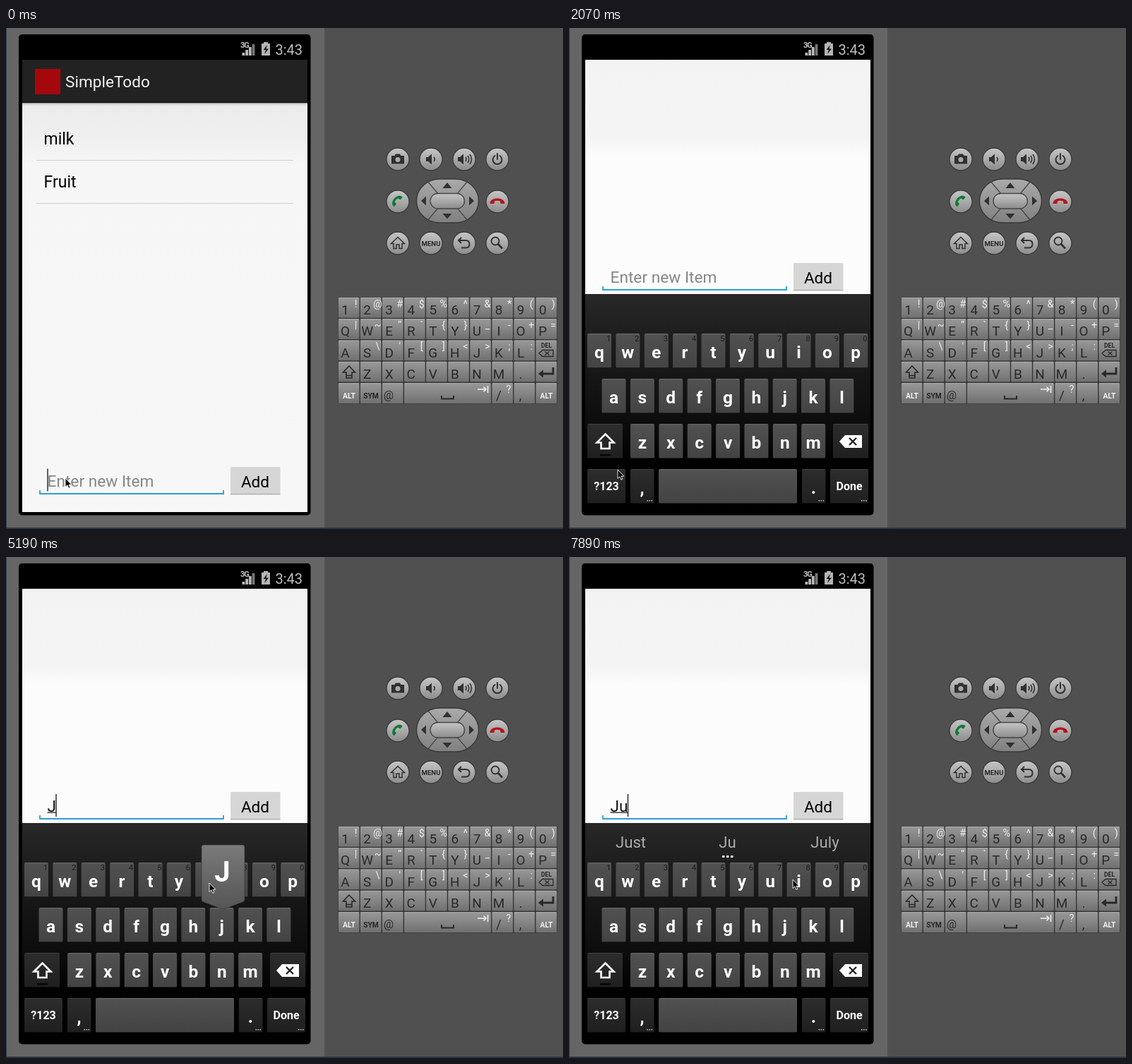
An HTML page that plays this animation: 789x710 px, repeating every 8000 ms.

```html
<!DOCTYPE html>
<html lang="en">
<head>
<meta charset="utf-8">
<title>To-do list in an emulator</title>
<style>
  html, body { margin: 0; width: 100%; height: 100%; overflow: hidden; background: #505050; }
  svg { display: block; width: 789px; height: 710px; }
  text { font-family: Roboto, "Noto Sans", sans-serif; white-space: pre; }
</style>
</head>
<body>
<svg id="stage" viewBox="0 0 789 710" xmlns="http://www.w3.org/2000/svg"></svg>
<script>
const LOOP = 8000;
const stage = document.getElementById('stage');

// Markup helpers
const rect = (x, y, w, h, fill, more = '') =>
  `<rect x="${x}" y="${y}" width="${w}" height="${h}" fill="${fill}" ${more}/>`;
const path = (d, fill, more = '') => `<path d="${d}" fill="${fill}" ${more}/>`;
const line = (d, color, width = 2, more = '') =>
  path(d, 'none', `stroke="${color}" stroke-width="${width}" ${more}`);
const text = (x, y, s, size, fill, more = '') => {
  const safe = s.replace(/&/g, '&amp;').replace(/</g, '&lt;');
  return `<text x="${x}" y="${y}" font-size="${size}" fill="${fill}" ${more}>${safe}</text>`;
};
const group = (id, body, more = '') => `<g id="${id}" ${more}>${body}</g>`;
const shade = (id, ...stops) =>
  `<linearGradient id="${id}" x2="0" y2="1">` + stops.map(([at, color]) =>
    `<stop offset="${at}" stop-color="${color}"/>`).join('') + '</linearGradient>';
const MID = 'text-anchor="middle"';
const BOLD = 'font-weight="700"';
const INK = '#303030';

const defs = '<defs>' +
  shade('listBg', [0, '#e9e9e9'], [.17, '#efefef'], [.23, '#f6f6f6'], [1, '#f7f7f7']) +
  shade('plainBg', [0, '#f3f3f3'], [.17, '#f4f4f4'], [.215, '#fcfcfc'], [1, '#fcfcfc']) +
  shade('boardBg', [0, '#282828'], [.18, '#1e1e1e'], [.6, '#0c0c0c'], [.75, '#020202'], [1, '#000']) +
  shade('key', [0, '#575757'], [.08, '#505050'], [1, '#434343']) +
  shade('darkKey', [0, '#2d2d2d'], [1, '#1f1f1f']) +
  shade('popBg', [0, '#7a7a7a'], [1, '#555']) +
  shade('knob', [0, '#c6c6c6'], [.5, '#aaa'], [1, '#8c8c8c']) +
  shade('pad', [0, '#aaa'], [1, '#808080']) +
  shade('hard', [0, '#989898'], [.5, '#858585'], [1, '#707070']) +
  '<clipPath id="screen"><rect x="23" y="45" width="404" height="641"/></clipPath></defs>';

function shell() {
  return rect(0, 0, 789, 710, '#505050') +
    rect(0, 0, 450, 710, '#656565') +
    rect(449, 0, 1.5, 708, '#6c6c6c') + rect(450.5, 0, 1.5, 708, '#585858') +
    rect(0, 0, 1, 710, '#21434b') + rect(0, 708, 789, 2, '#2a3644') +
    rect(18, 9, 413.5, 681.5, '#000', 'rx="5"') +
    text(332, 28, '3G', 11, '#c4c4c4', BOLD + ' letter-spacing="-1"') +
    [0, 1, 2, 3].map(i => rect(334.5 + i * 4.7, 35 - i * 4, 3.8, 4 + i * 4, i < 3 ? '#b9b9b9' : '#777')).join('') +
    path('M362 22H365V20H371V22H374V39H362Z', '#b5b5b5') +
    path('M370 24L364.5 31H368L366 37L372 29.500H368.500Z', '#111') +
    text(381.500, 37.500, '3:43', 20, '#bebebe');
}

function listView() {
  return rect(23, 45, 404, 641, 'url(#listBg)') +
    rect(23, 45, 404, 61, '#222') + rect(23, 105, 404, 1.5, '#111') +
    rect(23, 106.5, 404, 3, '#c8c8c8', 'opacity=".6"') +
    rect(41, 58, 36, 36, '#a5080c') +
    text(84, 84, 'SimpleTodo', 22.6, '#f3f3f3') +
    ['milk', 'Fruit'].map((s, i) =>
      text(53.5, 165 + i * 61, s, 23, '#000') + rect(43, 187 + i * 61, 364, 1, '#cfcfcf')).join('');
}

// Input row: hint, underline and button
const inputRow = id => group(id,
  text(58.5, 649.500, 'Enter new Item', 22.7, '#868686', 'class="hint"') +
  line('M48 655V660H308V655', '#2b9fd3', 1.8) +
  rect(318, 622, 70.5, 39, '#d6d6d6', 'rx="1.500"') + rect(318, 660, 70.5, 1.3, '#a9a9a9') +
  text(353, 651, 'Add', 22.6, '#000', MID));

function softBoard() {
  const key = (x, y, w, fill = 'key') =>
    rect(x, y, w, 49, `url(#${fill})`, 'rx="2"') +
    rect(x + 1, y, w - 2, 1, '#fff', 'opacity=".1"') + rect(x + 1, y + 48, w - 2, 1, '#000', 'opacity=".5"');
  const letters = (s, x0, y) => [...s].map((c, i) => {
    const x = x0 + i * 40.36;
    return key(x - 17, y, 34) + text(x, y + 35, c, 24.5, '#fff', `${MID} ${BOLD} class="letter"`);
  }).join('');
  const dots = (x, y) => [0, 3, 6].map(d => rect(x + d, y, 1.6, 1.6, '#bbb')).join('');
  const digits = [...'1234567890'].map((c, i) =>
    text(56 + i * 40.36, 444, c, 11, '#1d1d1d', MID)).join('');

  return rect(23, 377, 404, 310, 'url(#boardBg)') +
    letters('qwertyuiop', 43, 433) + digits +
    letters('asdfghjkl', 63.5, 497) + letters('zxcvbnm', 104, 561) +
    key(26, 561, 50, 'darkKey') + rect(44, 604, 15, 2.5, '#050505') +
    path('M51.5 575.5L63.500 587.500H57.500V596H45.500V587.500H39.500Z', 'none',
      'id="shift" stroke="#fff" stroke-width="2.6"') +
    key(374, 561, 50, 'darkKey') +
    path('M383 586L391 577H415V595H391Z', '#fff') +
    line('M397 581L407 591M407 581L397 591', '#222', 2.4) +
    key(26, 625, 54, 'darkKey') + text(53, 655, '?123', 16, '#fff', `${MID} ${BOLD}`) +
    key(87, 625, 33.500, 'darkKey') + text(103.500, 660, ',', 25, '#fff', `${MID} ${BOLD}`) +
    key(127, 625, 196) +
    key(330, 625, 33.500, 'darkKey') + text(346.500, 660, '.', 25, '#fff', `${MID} ${BOLD}`) +
    key(370, 625, 54, 'darkKey') + text(397, 655, 'Done', 16, '#fff', `${MID} ${BOLD}`) +
    dots(110.5, 669) + dots(353.5, 669) + dots(414, 669) +
    group('words', [87.500, 224.500, 362.500].map(x =>
      text(x, 411.500, '', 22.2, '#aaa', MID)).join('') +
      [217, 223, 229].map(x => rect(x, 423, 3.5, 3, '#e4e4e4')).join(''));
}

function hardPad() {
  const knobs = [186, 246, 305].map((y, row) => [555, 602, 649, 696].map((x, i) =>
    row === 1 && (i === 1 || i === 2) ? '' :
      `<circle cx="${x}" cy="${y}" r="16" fill="url(#knob)" stroke="#3b3b3b" stroke-width="1.300"/>`
  ).join('')).join('');
  const speaker = x => path(`M${x} 183H${x + 3}L${x + 8} 178.500V193.500L${x + 3} 189H${x}Z`, INK);
  const round = 'stroke-linecap="round" stroke-linejoin="round"';
  const handset = 'M-9 3C-10-7 10-7 9 3L4 3L3.500-.5C2-1.500-2-1.500-3.500-.5L-4 3Z';
  return knobs +
    // camera, volume and power
    path('M546 181H550.500L552 178.500H558L559.500 181H564V192.500H546Z', INK) +
    '<circle cx="555" cy="186.500" r="3.500" fill="#aaa"/>' +
    speaker(595) + line('M606 183Q608.500 186 606 189', INK, 1.600) +
    speaker(640) + line('M651 183Q653 186 651 189M654 181Q657.500 186 654 191M657 179Q662 186 657 193', INK, 1.5) +
    line('M692.500 181A6.500 6.500 0 1 0 699.500 181M696 178V186', INK, 2, round) +
    // call and hang up
    path(handset, '#0d7a32', 'transform="translate(553.500 244.500) rotate(-48)"') +
    path(handset, '#b5141c', 'transform="translate(696 246) scale(1.150 1)"') +
    // home, menu, back and search
    line('M545.500 305.500L555 296.500L564.500 305.500H561V312.500H557V307H553V312.500H549V305.500Z', INK, 1.500) +
    text(602, 309, 'MENU', 9.600, '#262626', `${MID} ${BOLD}`) +
    line('M645 297L641 301L645 305M642 301H651Q656.500 301 656.500 306Q656.500 311.500 651 311.500H645', INK, 2) +
    '<circle cx="693" cy="302" r="5.500" fill="none" stroke="#303030" stroke-width="1.800"/>' +
    line('M697 306L703 312.500', INK, 2.600) +
    // direction pad
    rect(581.500, 214, 88, 62, 'url(#pad)', 'rx="33" stroke="#383838" stroke-width="1.400"') +
    line('M597 217L612 235M654 217L639 235M597 273L612 255M654 273L639 255', '#484848', 1.300) +
    rect(601, 234.500, 48.500, 21.500, 'url(#knob)', 'rx="10.750" stroke="#444" stroke-width="1.300"') +
    path('M625 219L631.500 227H618.500ZM625 270.500L631.500 263H618.500ZM588 245L595 238.500V251.500ZM663 245L656 238.500V251.500Z', INK);
}

function hardBoard() {
  const W = 31.08, H = 30.3, X = 470, Y = 381;
  const cell = (c, r, n = 1) =>
    rect(X + c * W + .8, Y + r * H + .8, n * W - 1.400, H - 1.400, 'url(#hard)', 'rx="1"') +
    rect(X + c * W + 1.500, Y + r * H + 1, n * W - 3, 1, '#b8b8b8', 'opacity=".6"');
  const rows = [
    '1! 2@ 3# 4$ 5% 6^ 7& 8* 9( 0)',
    'Q| W~ E“ R` T{ Y} U_ I- O+ P=',
    "A S\\ D' F[ G] H< J> K; L:",
    ' Z X C V B N M .',
  ];
  let out = rect(X, Y, 311, 151.500, '#343434', 'rx="2"');
  for (let r = 0; r < 4; r++) for (let c = 0; c < 10; c++) {
    const [main = '', alt = ''] = rows[r].split(' ')[c] || '';
    out += cell(c, r) +
      text(X + c * W + 10.500, Y + r * H + 25, main, 19, '#292929', MID) +
      text(X + c * W + 25.500, Y + r * H + 14.500, alt, 14.500, '#ededed', MID);
  }
  [0, 1, 2, 7, 8, 9].forEach(c => out += cell(c, 4));
  out += cell(3, 4, 4);
  const alt = x => text(x, 525, 'ALT', 10.300, '#f2f2f2', `${MID} ${BOLD}`);
  return out + alt(486) + alt(765.500) +
    text(517, 525, 'SYM', 10.300, '#262626', `${MID} ${BOLD}`) +
    text(542, 526, '@', 16, '#292929', MID) +
    text(698, 527, '/', 19, '#292929', MID) + text(712, 517, '?', 14.500, '#ededed', MID) +
    text(728.500, 527, ',', 19, '#292929', MID) +
    line('M617 521V525.500H634V521', '#292929', 2) +
    line('M668 512H680M676.500 508.500L680 512L676.500 515.500M682.500 507V517', '#f2f2f2', 1.500) +
    line('M486 479L494.500 488H490V496H482V488H477.500ZM482 492.500H490', '#292929', 1.600) +
    line('M775 481V490H758', '#292929', 2.800) + path('M754 490L761 484.500V495.500Z', '#292929') +
    text(765.500, 453, 'DEL', 8.600, '#262626', `${MID} ${BOLD}`) +
    line('M755 461L760 456.500H775V465.500H760ZM763.500 458.500L769.500 463.500M769.500 458.500L763.500 463.500', '#292929', 1.300);
}

const popup = group('pop',
  path('M280 408H335Q338 408 338 411V485Q338 488 335 489L314 497Q307.500 500.500 301 497L280 489Q277 488 277 485V411Q277 408 280 408Z',
    'url(#popBg)', 'stroke="#333" stroke-width=".6"') +
  text(306.500, 460, 'J', 40, '#fff', `${MID} ${BOLD}`));

const typed = group('typed', text(58.500, 360.500, '', 22.7, '#111') + rect(58.500, 361.500, 0, 1.300, '#222'));

stage.innerHTML = defs + shell() +
  `<g clip-path="url(#screen)">` +
  group('list', listView()) +
  group('plain', rect(23, 45, 404, 641, 'url(#plainBg)') + rect(23, 658, 404, 28, '#f7f7f7')) +
  inputRow('rowA') + inputRow('rowB') + inputRow('rowC') +
  typed + rect(58.300, 336, 1.400, 32, '#222', 'id="caret"') +
  group('board', softBoard()) + popup + '</g>' +
  hardPad() + hardBoard() +
  path('M0 0V12.500L2.900 9.800L4.900 14.300L6.900 13.400L5 9.200H8.800Z', '#000',
    'id="mouse" stroke="#fff" stroke-width=".9"');

const el = id => document.getElementById(id);
const [mouse, caret, pop, board, words, shift] = ['mouse', 'caret', 'pop', 'board', 'words', 'shift'].map(el);
const letters = [...document.querySelectorAll('.letter')];
const lower = letters.map(n => n.textContent);
const show = (node, on) => node.setAttribute('visibility', on ? 'visible' : 'hidden');
const move = (node, x, y) => node.setAttribute('transform', `translate(${x} ${y})`);

// Each step changes only the listed parts of the state
const start = { view: 'list', at: [84, 638], caret: 1, typed: '', caps: 0, pop: '', words: '' };
const steps = [
  [140, { at: [72, 638.5] }],
  [590, { caret: 0 }],
  [1030, { caret: 1 }],
  [1480, { view: 'rows', caret: 0 }],
  [1630, { view: 'rise' }],
  [1780, { view: 'board', at: [71, 635] }],
  [1930, { at: [69, 626] }],
  [2080, { at: [66, 613], caret: 1 }],
  [2220, { at: [63, 600] }],
  [2370, { at: [60, 588] }],
  [2520, { at: [57, 578], caret: 0 }],
  [2670, { at: [45.5, 585] }],
  [3110, { caret: 1 }],
  [3410, { caps: 1 }],
  [3560, { caret: 0, at: [51, 583] }],
  [3710, { at: [84, 575] }],
  [3860, { at: [138, 562] }],
  [4010, { at: [195, 549], caret: 1 }],
  [4160, { at: [242, 538] }],
  [4300, { at: [274, 530] }],
  [4450, { at: [292, 525], caret: 0 }],
  [4600, { at: [300, 522] }],
  [4750, { at: [303, 520] }],
  [4900, { caret: 1 }],
  [5050, { typed: 'J', pop: 'J', caps: 0 }],
  [5190, { at: [288, 462] }],
  [5340, { pop: '', words: 'Just J Judge', at: [284, 457] }],
  [5490, { caret: 0 }],
  [5790, { typed: 'Ju', pop: 'u', caret: 1 }],
  [5940, { pop: '', words: 'Just Ju July' }],
  [6090, { at: [294, 457] }],
  [6240, { at: [309, 457] }],
  [6390, { at: [317, 457], caret: 0 }],
  [6840, { caret: 1 }],
  [7290, { caret: 0 }],
  [7890, { caret: 1 }],
];

function render(s) {
  const list = s.view === 'list', rows = s.view === 'rows', rise = s.view === 'rise';
  show(el('list'), list);
  show(el('plain'), !list);
  show(el('rowB'), rows || rise);
  show(el('rowC'), list || rows || rise);
  show(el('rowA'), !list);
  move(el('rowA'), 0, rows ? -280 : -289);
  move(el('rowB'), 0, -155.5);

  show(board, !list && !rows);
  move(board, 0, rise ? 1.500 : 0);
  board.setAttribute('opacity', rise ? .94 : 1);
  letters.forEach((n, i) => n.textContent = s.caps ? lower[i].toUpperCase() : lower[i]);
  shift.setAttribute('fill', s.caps ? '#fff' : 'none');

  const end = s.typed.length * 12.500;
  const [label, rule] = el('typed').children;
  label.textContent = s.typed;
  rule.setAttribute('width', end);
  el('rowA').querySelector('.hint').setAttribute('opacity', s.typed ? 0 : 1);
  show(caret, s.caret);
  move(caret, end - (end ? .5 : 0), list ? 288.5 : 0);

  const u = s.pop === 'u';
  pop.setAttribute('display', s.pop ? 'inline' : 'none');
  pop.lastChild.textContent = s.pop;
  move(pop, u ? -21 : 0, u ? -64 : 0);

  words.setAttribute('display', s.words ? 'inline' : 'none');
  s.words.split(' ').forEach((w, i) => words.children[i].textContent = w);
  move(mouse, ...s.at);
}

const t0 = performance.now();
let last = -1;
function tick() {
  const t = (performance.now() - t0) % LOOP;
  const past = steps.filter(([at]) => at <= t);
  if (past.length !== last) {
    last = past.length;
    render(Object.assign({}, start, ...past.map(([, change]) => change)));
  }
  requestAnimationFrame(tick);
}
tick();
</script>
</body>
</html>
```
